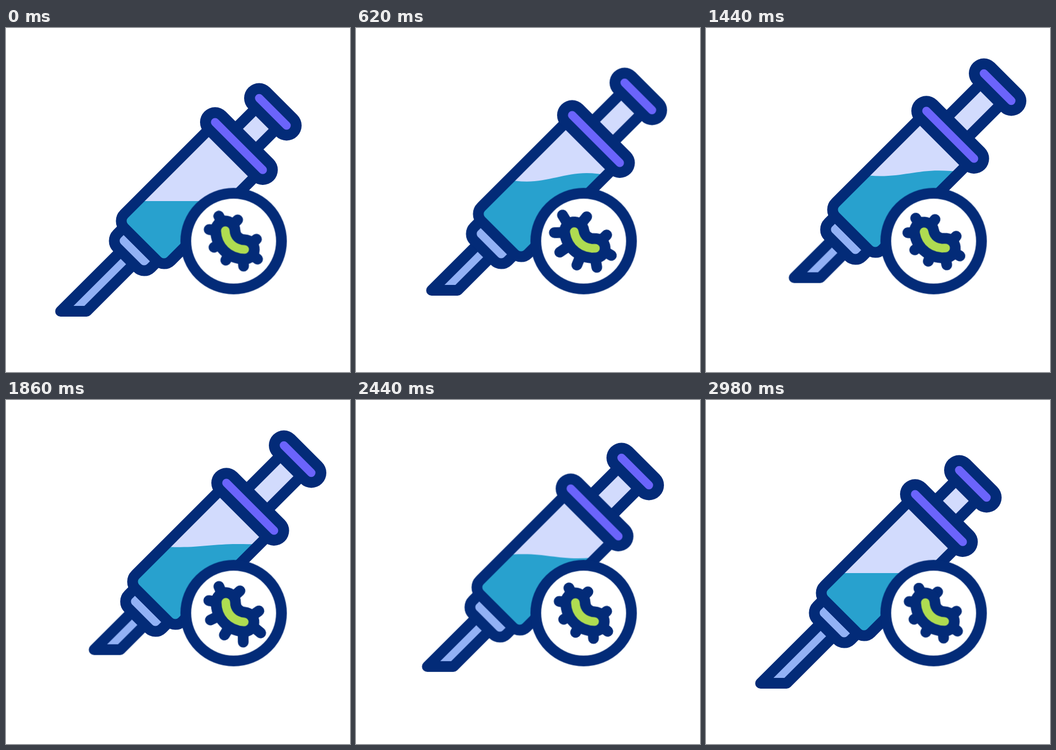
These frames come from a looping animation (640 px wide and 640 px high, 3600 ms). An HTML page without scripts:

```html
<!DOCTYPE html>
<html lang="en">
<head>
<meta charset="utf-8">
<title>Syringe and microbe</title>
<style>
  html, body { margin: 0; width: 100%; height: 100%; overflow: hidden; background: #fff; }
  svg { display: block; width: 100vw; height: 100vh; }

  .ink { stroke: #032b78; stroke-width: 20; stroke-linejoin: round; stroke-linecap: round; fill: none; }
  .pale { fill: #d2dbfd; }
  .steel { fill: #92b1f5; }
  .liquid { fill: #28a1ce; }
  .grip { stroke-width: 56; }
  .pad { stroke: #6b64fb; stroke-width: 15.5; stroke-linecap: round; }
  .rod { stroke-width: 74; stroke-linecap: butt; }
  .core { stroke: #d2dbfd; stroke-width: 34; }
  .germ { stroke: #afdc51; stroke-width: 16; stroke-linecap: round; fill: none; }

  .slide, .liquid, .bug, .legs path {
    animation: 3.6s cubic-bezier(.333, 0, .667, 1) infinite;
  }
  .slide { animation-name: slide; }
  .liquid { animation-name: slosh; }
  .bug { animation-name: wobble; }
  .legs path { animation-name: stretch; }

  /* every syringe part slides along the same diagonal, by its own distance */
  @keyframes slide {
    0%, 82.78%, 100% { transform: translate(0, 0); }
    29.55%, 52.78% { transform: translate(var(--d), calc(-1 * var(--d))); }
  }
  @keyframes slosh {
    0%, 82.78%, 100% { d: path("M205 322C245 322 275 322 305 322C345 322 377 322 417 322C442 322 462 322 500 322V470H205Z"); }
    15%, 45% { d: path("M205 290C245 290 275 299.5 305 299.5C345 299.5 377 282 417 282C442 282 462 290 500 290V470H205Z"); }
    30%, 60% { d: path("M205 292C245 292 270 288 300 288C340 288 357 298.7 397 298.7C427 298.7 462 290 500 290V470H205Z"); }
  }
  @keyframes wobble {
    0%, 70%, 100% { transform: rotate(0deg); }
    14%, 42% { transform: rotate(-8deg); }
    28%, 56% { transform: rotate(5.8deg); }
  }
  @keyframes stretch {
    0%, 42%, 70%, 100% { transform: translate(0, 0); }
    14% { transform: translate(var(--a)); }
    28%, 56% { transform: translate(var(--b)); }
  }
</style>
</head>
<body>
<svg viewBox="0 0 640 640">
  <defs>
    <path id="barrel" d="M390 176L219.7 346.3A18 18 0 0 0 219.7 371.7L281.3 433.3A18 18 0 0 0 306.7 433.3L477 263Z"/>
    <clipPath id="inside"><use href="#barrel"/></clipPath>
  </defs>

  <g class="slide" style="--d:62.5px">
    <path class="ink steel" d="M239.5 389.5L101.5 527H150L263.5 413.5Z"/>
  </g>

  <g class="slide" style="--d:46px">
    <path class="ink rod" d="M496.5 156L423 229.5"/>
    <path class="core" d="M496.5 156L423 229.5"/>
    <path class="ink grip" d="M471 130.5L522 181.5"/>
    <path class="pad" d="M471 130.5L522 181.5"/>
  </g>

  <g class="slide" style="--d:21px">
    <path class="ink steel" d="M219 371L206.7 383.3A18 18 0 0 0 206.7 408.7L244.3 446.3A18 18 0 0 0 269.7 446.3L282 434Z"/>
    <use href="#barrel" class="pale"/>
    <g clip-path="url(#inside)">
      <path class="liquid" d="M205 322C245 322 275 322 305 322C345 322 377 322 417 322C442 322 462 322 500 322V470H205Z"/>
    </g>
    <use href="#barrel" class="ink"/>
    <path class="ink grip" d="M389 175.3L477.7 264"/>
    <path class="pad" d="M389 175.3L477.7 264"/>
  </g>

  <g transform="translate(423.5 396.5)">
    <circle class="ink" r="89" style="fill:#fff"/>
    <g class="bug">
      <g class="ink legs">
        <path d="M-27.5-46.5L-17-24" style="--a:-7px,-6.5px;--b:-2.8px,-2.3px"/>
        <path d="M7.5-39.5L-8-24" style="--a:3px,-5.3px;--b:3px,-3.2px"/>
        <path d="M-45.5-21.5L-20-19" style="--a:-7.7px,0px;--b:-2.2px,.5px"/>
        <path d="M42.5-3.5L25 10" style="--a:.7px,-3.2px;--b:5.5px,-3.6px"/>
        <path d="M-36.5 11.5L-15 0" style="--a:-10.2px,4.2px;--b:-7.8px,4.3px"/>
        <path d="M-14.5 35.5L-3 14" style="--a:-3px,7.4px;--b:-1px,7.8px"/>
        <path d="M18.5 46.5L17 20" style="--a:.4px,4px;--b:2.4px,8.4px"/>
        <path d="M44.5 33.5L24 18" style="--a:3px,-2px;--b:9.7px,1.2px"/>
      </g>
      <path class="ink grip" d="M-15.5-19.5C-14.5 1 0 15 20.5 15.5"/>
      <path class="germ" d="M-15.5-19.5C-14.5 1 0 15 20.5 15.5"/>
    </g>
  </g>
</svg>
</body>
</html>
```
